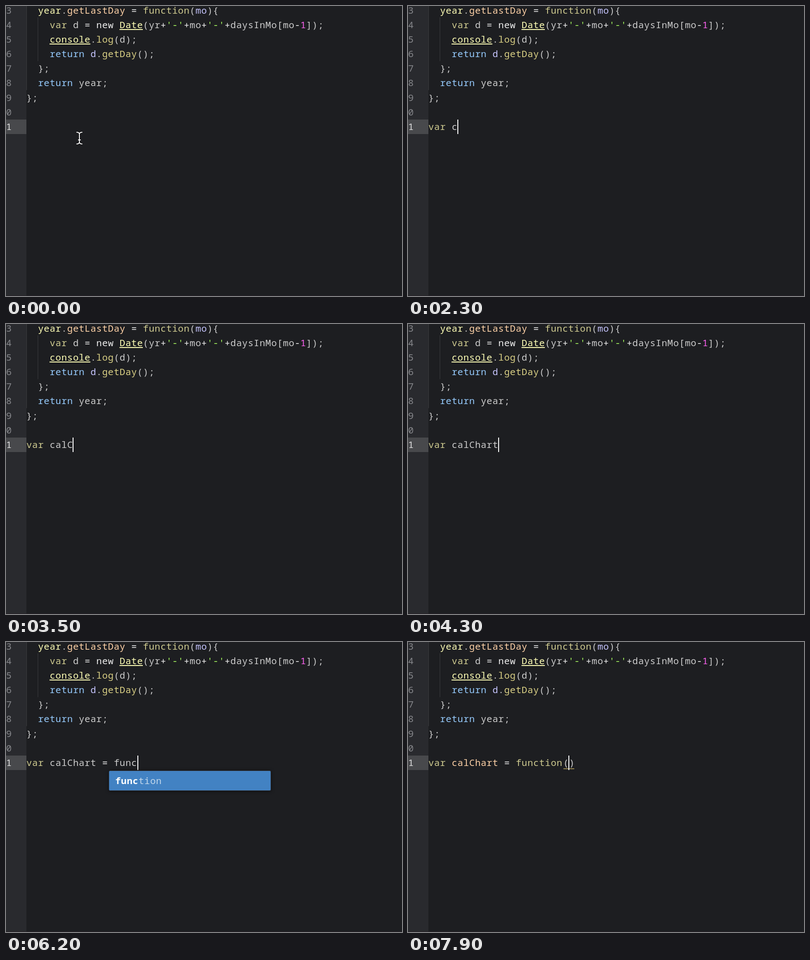
These frames come from a looping animation (874x641 px, 8 s). An HTML page with a canvas:

```html
<!DOCTYPE html>
<html lang="en">
<head>
<meta charset="utf-8">
<title>Typing in a code editor</title>
<style>
html, body { margin: 0; width: 100%; height: 100%; overflow: hidden; background: #1d1e21; }
canvas { display: block; }
</style>
</head>
<body>
<canvas id="stage" width="874" height="641"></canvas>
<script>
const ctx = document.getElementById('stage').getContext('2d');
const W = 874, H = 641, LOOP = 8000;
const CELL = 12.87, LINE = 32.17, LEFT = 44.6, BASE = 16.6, ITEM = 43;
const SIZE = 20.4;
const FAMILY = '"Noto Sans Mono", "DejaVu Sans Mono", monospace';

const C = {
  text: '#cccccc', bright: '#ededed', type: '#cfcb90', call: '#dad085', key: '#96cbfe',
  name: '#ffd2a7', obj: '#ffffb6', param: '#c6c5fe', str: '#a8ff60', num: '#ff63f2'
};

// Each run: text, colour, underlined
const CODE = [
  [['  '], ['year', C.obj], ['.'], ['getLastDay', C.name], [' = ', C.bright], ['function', C.type], ['('], ['mo', C.param], ['){']],
  [['    '], ['var', C.type], [' d '], ['= new ', C.bright], ['Date', C.obj, true], ['(yr'], ['+', C.bright], ["'-'", C.str],
   ['+', C.bright], ['mo'], ['+', C.bright], ["'-'", C.str], ['+', C.bright], ['daysInMo[mo'], ['-', C.bright], ['1', C.num], [']);']],
  [['    '], ['console', C.obj, true], ['.'], ['log', C.call], ['(d);']],
  [['    '], ['return', C.key], [' '], ['d', C.param], ['.'], ['getDay', C.call], ['();']],
  [['  };']],
  [['  '], ['return', C.key], [' year;']],
  [['};']]
];

const TYPED = 'var calChart = function(';
// Time at which each character of TYPED appears
const KEYS = [1100, 1300, 1500, 1700, 2300, 2600, 2900, 3400, 3600, 3800, 4000, 4200,
  4700, 5000, 5300, 5600, 5800, 5900, 6100, 6500, 6800, 7000, 7200, 7500];

// Suggestions: start, end, word column, icons, rows of [word, label]
const MENUS = [
  [2700, 3000, 4, true, [['case', 'case'], ['class', 'Class']]],
  [3000, 3200, 4, false, [['call'], ['callee'], ['caller'], ['calc'], ['called'], ['calls'], ['callback']]],
  [5800, 6000, 15, true, [['f', 'Function'], ['for', 'for'], ['forin', 'for in'], ['forof', 'for of'], ['fun', 'Function'], ['function', '']]],
  [6000, 7400, 15, false, [['function']]]
];

function box(x, y, w, h, color) {
  ctx.fillStyle = color;
  ctx.fillRect(x, y, w, h);
}

// Sets each character in the middle of its editor cell
function write(text, x, y, color, bold, scale = 1) {
  ctx.font = (bold ? 'bold ' : '') + SIZE * scale + 'px ' + FAMILY;
  ctx.fillStyle = color;
  ctx.textAlign = 'center';
  for (const ch of text) {
    if (ch !== ' ') ctx.fillText(ch, x + CELL * scale / 2, y);
    x += CELL * scale;
  }
  return x;
}

const baseline = row => BASE + LINE * row;

function drawLine(row, runs) {
  let x = LEFT;
  const y = baseline(row);
  for (const [text, color = C.text, under] of runs) {
    const end = write(text, x, y, color);
    if (under) box(x, Math.round(y + 2), end - x, 2, color);
    x = end;
  }
}

function drawEditor() {
  box(0, 0, W, H, '#1d1e21');
  box(0, 0, 45, H, '#292a2e');
  box(0, 251, 45, 32, '#48494c');
  box(45, 0, 1, 186, '#3b3c3f');
  box(70, 25, 1, 97, '#3b3c3f');
  box(0, 640, W, 1, '#262128');
  [...'345678901'].forEach((n, row) =>
    write(n, 0, baseline(row), row === 8 ? '#dedede' : '#85868a'));
  CODE.forEach((runs, row) => drawLine(row, runs));
}

function drawTyped(count, t) {
  const text = TYPED.slice(0, count);
  const open = count === TYPED.length;
  drawLine(8, [
    [text.slice(0, 3), count >= 3 ? C.type : C.text],
    [text.slice(3, 12), open ? C.name : C.text],
    [text.slice(12, 15), C.bright],
    [text.slice(15, 23), count >= 23 ? C.type : C.text]
  ]);
  if (open) {
    write('()', LEFT + 23 * CELL + 1.6, baseline(8), C.text);
    box(343, 279.5, 24, 1.4, '#c9b267');
  }
  const blinkOn = count > 0 || (t >= 200 && t < 600);
  if (blinkOn) box(Math.round(44 + count * 12.93), 251, 2, 32, '#ffffff');
}

function drawIcon(x, y, on) {
  box(x, y, 43, ITEM, on ? '#538fb4' : '#3b463e');
  ctx.fillStyle = on ? '#9fdcac' : '#9fd6a0';
  const m = y + ITEM / 2 + 0.5;
  ctx.fillRect(x + 11, m - 2.5, 9, 5);
  ctx.beginPath();
  ctx.moveTo(x + 19, m - 6.5);
  ctx.lineTo(x + 27, m);
  ctx.lineTo(x + 19, m + 6.5);
  ctx.fill();
  ctx.fillRect(x + 30, m - 7, 3, 14);
}

function drawMenu([, , col, icons, rows], count) {
  const wordX = LEFT + col * CELL;
  const x = Math.round(wordX - (icons ? 57 : 10.5)), y = 285, w = 357, h = rows.length * ITEM;
  const prefix = TYPED.slice(col, count);
  ctx.save();
  ctx.shadowColor = 'rgba(0,0,0,0.6)';
  ctx.shadowBlur = 7;
  ctx.shadowOffsetY = 1;
  ctx.fillStyle = '#303135';
  ctx.beginPath();
  ctx.roundRect(x, y - 1, w + 1, h + 2, 3);
  ctx.fill();
  ctx.restore();

  ctx.save();
  ctx.beginPath();
  ctx.roundRect(x + 0.5, y, w - 0.5, h, 2);
  ctx.clip();
  rows.forEach(([word, label = ''], i) => {
    const top = y + i * ITEM, on = i === 0, base = top + 28.8;
    box(x, top, w, ITEM, on ? '#4282c3' : '#1c1d20');
    if (icons) drawIcon(x, top, on);
    let hit = 0, cx = wordX + 3;
    for (const ch of word) {
      const bold = ch === prefix[hit];
      if (bold) hit++;
      cx = write(ch, cx, base, bold ? '#ffffff' : on ? '#c3d8ec' : '#a9aaac', bold);
    }
    write(label, x + 345 - label.length * CELL * 0.9, base, on ? '#a9c8e5' : '#505155', false, 0.9);
  });
  ctx.restore();
}

function drawPointer() {
  ctx.beginPath();
  for (const s of [-1, 1]) {
    ctx.moveTo(155.5, 292 + s * 13);
    ctx.quadraticCurveTo(161, 292 + s * 13, 162, 292 + s * 9.5);
    ctx.quadraticCurveTo(163, 292 + s * 13, 168.5, 292 + s * 13);
  }
  ctx.moveTo(162, 282);
  ctx.lineTo(162, 302);
  ctx.moveTo(159, 296);
  ctx.lineTo(165, 296);
  for (const [width, color] of [[4, '#0c0c0d'], [2, '#ffffff']]) {
    ctx.lineWidth = width;
    ctx.strokeStyle = color;
    ctx.stroke();
  }
}

function draw(now) {
  const t = now % LOOP;
  const count = KEYS.filter(k => k <= t).length;
  drawEditor();
  drawTyped(count, t);
  const menu = MENUS.find(m => t >= m[0] && t < m[1]);
  if (menu) drawMenu(menu, count);
  if (!count) drawPointer();
}

const start = performance.now();
function tick() {
  draw(performance.now() - start);
  requestAnimationFrame(tick);
}
tick();
</script>
</body>
</html>
```
